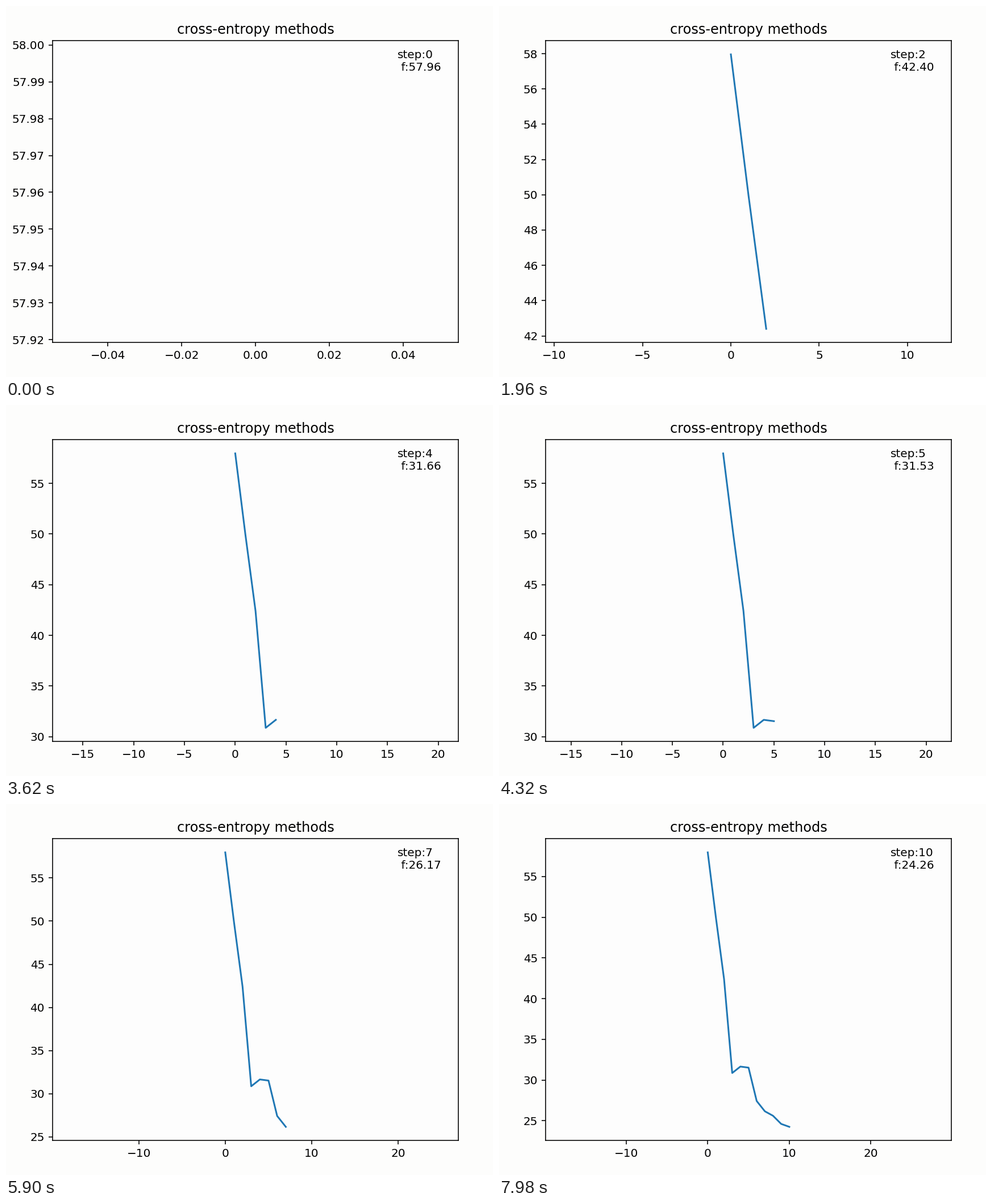
Animation, 857 px wide and 654 px high, one loop 8000 ms. Source, as a matplotlib script:

```python
import matplotlib.pyplot as plt
from matplotlib.animation import FuncAnimation

W, H, DPI = 857, 654, 144
LEFT, BOTTOM, AX_W, AX_H = 82, 60.7, 714.24, 532.22  # axes box in pixels
FRAME_MS, LOOP_MS = 40, 8000
STEP_MS, LEAD_MS = 797, 53

costs = [57.9602, 49.95, 42.4, 30.87, 31.66, 31.53,
         27.43, 26.17, 25.62, 24.62, 24.26]

# the tiny surplus guards against rounding down to a smaller canvas
fig = plt.figure(figsize=((W + 1e-6) / DPI, (H + 1e-6) / DPI),
                 dpi=DPI, facecolor="#fdfdfc")
ax = fig.add_axes([LEFT / W, BOTTOM / H, AX_W / W, AX_H / H],
                  facecolor="#fdfdfd")
ax.set_title("cross-entropy methods")
line, = ax.plot([], [], color="#1f77b4", lw=1.5)
label = ax.text(0.85, 0.9, "", transform=ax.transAxes)


def fit_equal(values):
    """Centre the data and give both axes the same scale."""
    low, high = min(values), max(values)
    mid_x, mid_y = (len(values) - 1) / 2, (low + high) / 2
    half_x = 0.055
    if high > low:
        half_x = 0.55 * (high - low) * AX_W / AX_H
    half_y = half_x * AX_H / AX_W
    ax.set_xlim(mid_x - half_x, mid_x + half_x)
    ax.set_ylim(mid_y - half_y, mid_y + half_y)


def update(frame):
    step = int((frame * FRAME_MS + LEAD_MS) // STEP_MS)
    step = min(step, len(costs) - 1)
    values = costs[:step + 1]
    line.set_data(range(step + 1), values)
    fit_equal(values)
    label.set_text(f"step:{step}\n f:{values[-1]:.2f}")
    return line, label


anim = FuncAnimation(fig, update, frames=LOOP_MS // FRAME_MS,
                     interval=FRAME_MS, repeat=True, repeat_delay=0,
                     blit=False)
plt.show()
```
